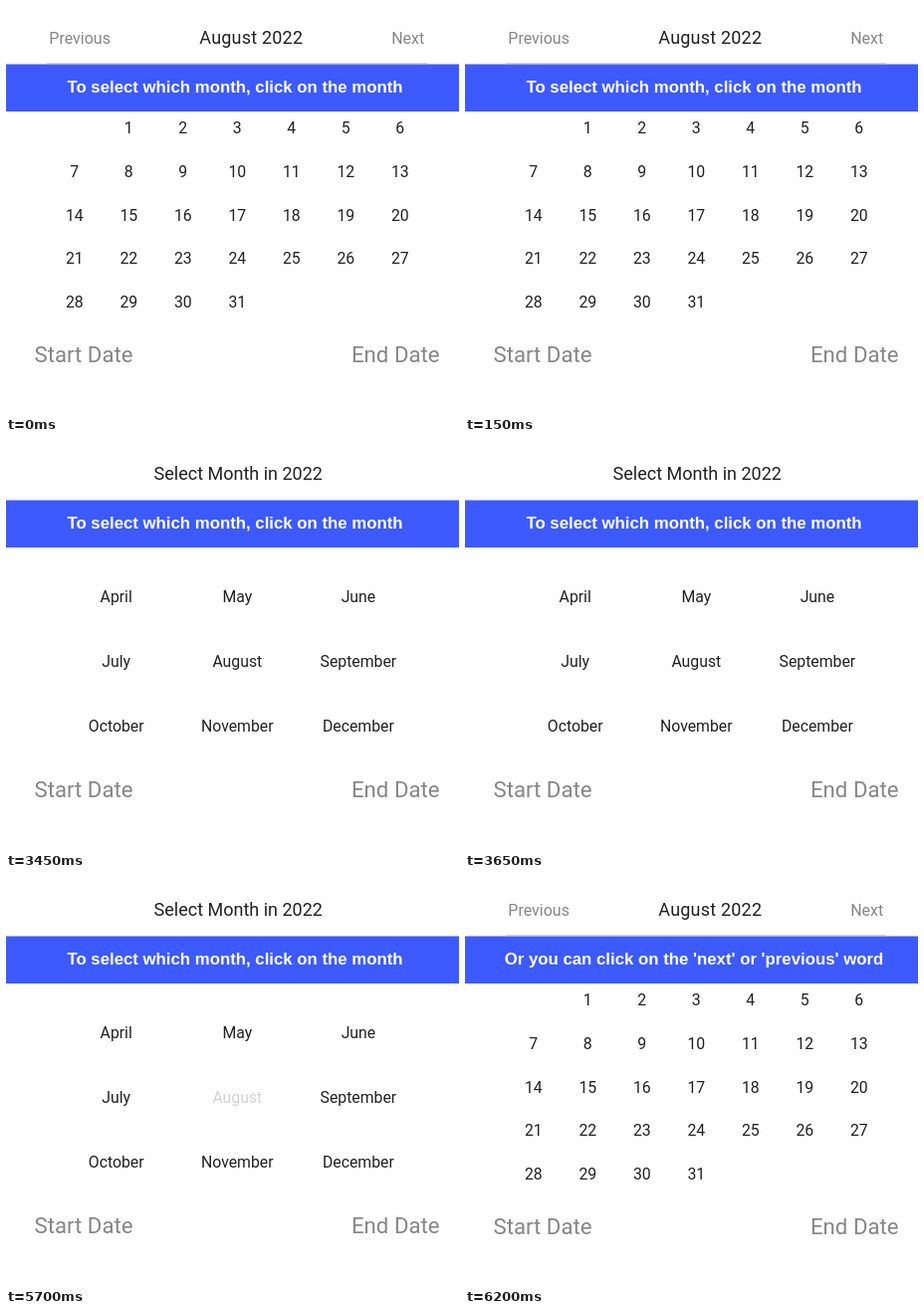
These frames come from a looping animation (455 px wide and 410 px high, 8000 ms). An HTML page:

```html
<!DOCTYPE html>
<html lang="en">
<head>
<meta charset="utf-8">
<style>
  html, body { margin: 0; width: 100%; height: 100%; overflow: hidden; background: #fff; }
  svg { display: block; width: 455px; height: 410px; }
  text { font: 15.8px Roboto, sans-serif; fill: #212121; }
  .mid { text-anchor: middle; }
  .head { font-size: 18px; }
  .nav { font-size: 16px; fill: #868686; }
  .date { font-size: 22.2px; fill: #868686; }
  #banner { font: bold 16.8px "Liberation Sans", Arial, sans-serif; fill: #fff; }
  .pressed { fill: #d3d3d3; }
</style>
</head>
<body>
<svg viewBox="0 0 455 410">
  <g id="days">
    <text class="nav" x="43.3" y="38">Previous</text>
    <text class="head" x="194.3" y="38" letter-spacing=".2"><tspan id="title">August</tspan> 2022</text>
    <text class="nav" x="387.2" y="38">Next</text>
    <path d="M41 57.5H423" stroke="#d0d0d0"/>
  </g>
  <g id="months">
    <text class="head" x="148.6" y="38">Select Month in 2022</text>
  </g>
  <path d="M0 58.5H455V106H0Z" fill="#3d5afe"/>
  <text id="banner" class="mid" x="230" y="87"></text>
  <g id="dates">
    <text class="date" x="28.5" y="358">Start Date</text>
    <text class="date" x="347" y="358">End Date</text>
  </g>
</svg>
<script>
const LOOP = 8000;
const byId = id => document.getElementById(id);
const [days, months, title, banner, dates] =
  ['days', 'months', 'title', 'banner', 'dates'].map(byId);

function addText(parent, label, x, y) {
  const el = document.createElementNS('http://www.w3.org/2000/svg', 'text');
  el.setAttribute('class', 'mid');
  el.setAttribute('x', x);
  el.setAttribute('y', y);
  el.textContent = label;
  parent.append(el);
  return el;
}

// 1 August 2022 falls in the second column.
for (let day = 1; day <= 31; day++) {
  addText(days, day, 68.8 + day % 7 * 54.5, 128.4 + Math.floor(day / 7) * 43.6);
}

const names = ['April', 'May', 'June', 'July', 'August', 'September',
  'October', 'November', 'December'];
const cells = names.map((name, i) =>
  addText(months, name, 110.7 + i % 3 * 121.6, 161 + Math.floor(i / 3) * 65));

function draw(now) {
  const t = now % LOOP;
  const picking = t >= 3450 && t < 6200;
  days.style.display = picking ? 'none' : '';
  months.style.display = picking ? '' : 'none';
  title.classList.toggle('pressed', t >= 3250 && t < 3450);
  cells[4].classList.toggle('pressed', t >= 5700);
  dates.setAttribute('transform', `translate(0 ${picking ? -1 : 0})`);
  banner.textContent = t < 6100
    ? 'To select which month, click on the month'
    : "Or you can click on the 'next' or 'previous' word";
}

const start = performance.now();
function tick() {
  draw(performance.now() - start);
  requestAnimationFrame(tick);
}
tick();
</script>
</body>
</html>
```
